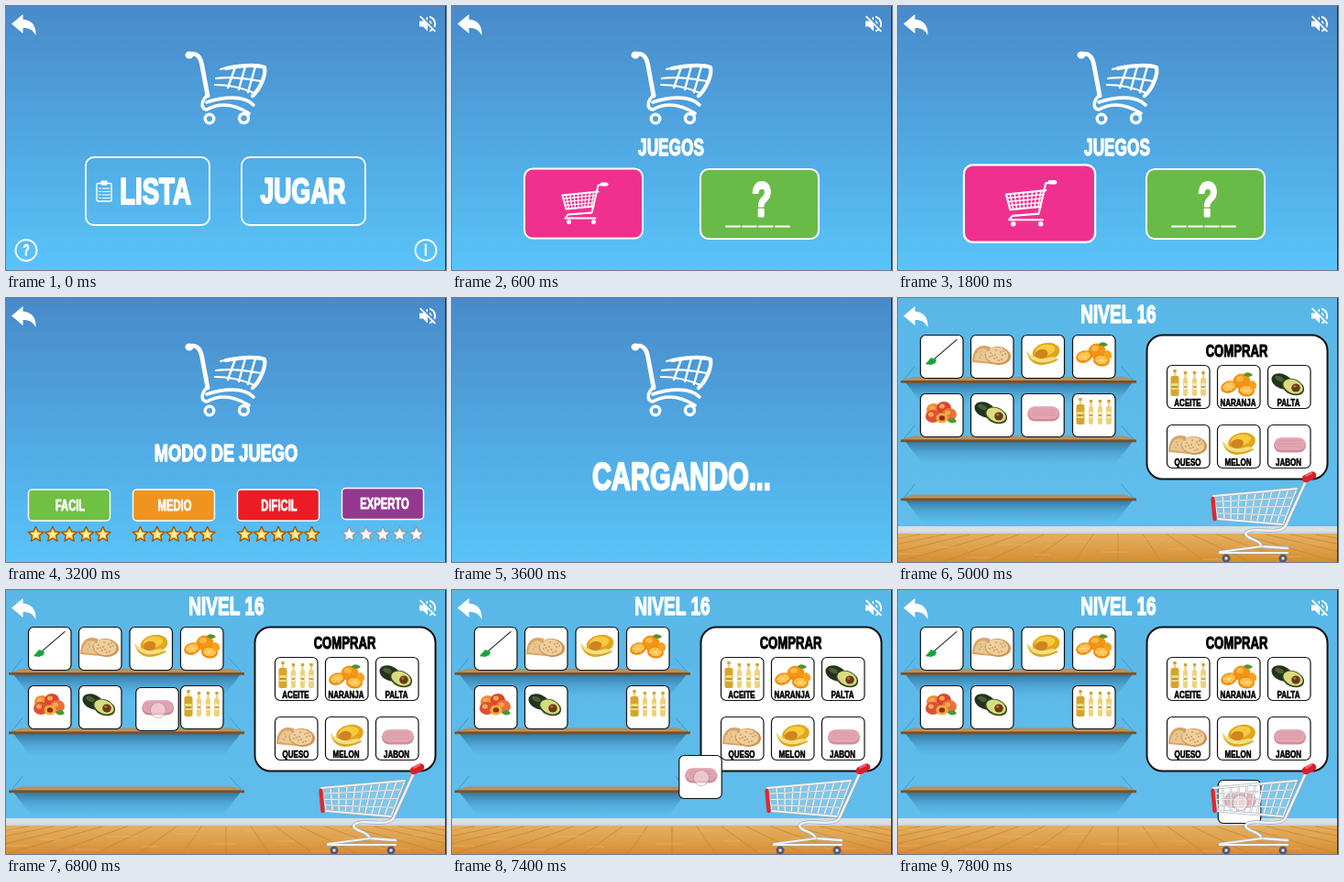
An HTML page with a canvas that plays this animation: 480x288 px, repeating every 8 s.

```html
<!DOCTYPE html>
<html lang="es">
<head>
<meta charset="utf-8">
<title>Juego de compras</title>
<style>
html, body { margin: 0; width: 100%; height: 100%; overflow: hidden; background: #5bb9ea; }
canvas { display: block; width: 100vw; height: 100vh; }
</style>
</head>
<body>
<canvas id="stage" width="480" height="288"></canvas>
<script>
const ctx = document.getElementById('stage').getContext('2d');
const LOOP = 8000, STEP = 200;
const NARROW = 0.69; // condensed lettering for every label

function fill(d, color) {
  ctx.fillStyle = color;
  ctx.fill(new Path2D(d));
}

function line(d, width, color = '#fff') {
  ctx.strokeStyle = color;
  ctx.lineWidth = width;
  ctx.stroke(new Path2D(d));
}

function oval(x, y, rx, ry, color, turn = 0, edge, width = 1) {
  ctx.beginPath();
  ctx.ellipse(x, y, rx, ry, turn, 0, Math.PI * 2);
  if (color) { ctx.fillStyle = color; ctx.fill(); }
  if (edge) { ctx.strokeStyle = edge; ctx.lineWidth = width; ctx.stroke(); }
}

function box(x, y, w, h, r, color, edge, width = 2) {
  ctx.beginPath();
  ctx.roundRect(x, y, w, h, r);
  if (color) { ctx.fillStyle = color; ctx.fill(); }
  if (edge) { ctx.strokeStyle = edge; ctx.lineWidth = width; ctx.stroke(); }
}

// Centred capitals; y is the middle of the letters.
function label(text, x, y, size, color = '#fff') {
  ctx.save();
  ctx.translate(x, y + size * 0.35);
  ctx.scale(NARROW, 1);
  ctx.font = `bold ${size}px "Liberation Sans", Arial, sans-serif`;
  ctx.textAlign = 'center';
  ctx.fillStyle = ctx.strokeStyle = color;
  ctx.lineWidth = size * 0.055;
  ctx.fillText(text, 0, 0);
  ctx.strokeText(text, 0, 0);
  ctx.restore();
}

function at(x, y, scale, draw) {
  ctx.save();
  ctx.translate(x, y);
  ctx.scale(scale, scale);
  draw();
  ctx.restore();
}

function gradient(y0, y1, ...colors) {
  const g = ctx.createLinearGradient(0, y0, 0, y1);
  colors.forEach((c, i) => g.addColorStop(i / (colors.length - 1), c));
  return g;
}

function topIcons() {
  fill('M6 19.5L18.5 9V14.7C27 15 33 20 32.5 32C29 25.5 25 23.8 18.5 24V30Z', '#fff');
  at(448, 7.5, 1, () => fill('M16.5 12C16.5 10.2 15.5 8.7 14 8V10.2L16.4 12.6ZM19 12C19 12.9 18.8 13.8 18.5 14.6L20 16.2C20.6 15 21 13.5 21 12C21 7.7 18 4.1 14 3.2V5.3C16.9 6.1 19 8.8 19 12ZM4.3 3L3 4.3L7.7 9H3V15H7L12 20V13.3L16.2 17.5C15.6 18 14.8 18.4 14 18.7V20.8C15.4 20.5 16.6 19.8 17.7 19L19.7 21L21 19.7ZM12 4L9.9 6.1L12 8.2Z', '#fff'));
}

function emblem() {
  oval(200, 53.5, 4.5, 4, '#fff');
  line('M200 53C208 50 212 56 213.5 63L220 98', 4.8);
  line('M220 97C213 103 212 112 219 113C235 104 252 109 265 117', 3.6);
  line('M219 105C236 99 260 97 270 108', 3.6);
  line('M240 68C256 65 272 63 282 67C284 75 277 91 269 98', 4.2);
  line('M234 69C248 65 266 64 281 67M229 79C244 77 262 79 278 82M228 86C240 86 257 89 271 95', 2.2);
  line('M250 67L242 89M261 66L254 91M272 66L264 94', 2.4);
  oval(222, 123, 4.8, 4.8, null, 0, '#fff', 3.4);
  oval(259.5, 122.5, 5, 5, null, 0, '#fff', 3.4);
}

function skyScreen(icons = true) {
  ctx.fillStyle = gradient(0, 288, '#488aca', '#59c4f9');
  ctx.fillRect(0, 0, 480, 288);
  if (icons) topIcons();
  emblem();
}

function badge(sign, x) {
  oval(x, 266.5, 11.5, 11.5, null, 0, '#fff', 1.8);
  label(sign, x, 266.5, 17);
}

function menu(t) {
  skyScreen();
  box(87, 165, 135, 74, 9, null, '#fff', 1.8);
  label('LISTA', 163, 202, 40);
  box(99, 193.5, 16, 19.5, 1, null, '#fff', 1.4);
  box(103.5, 190.5, 7, 5, 1, '#fff');
  for (let y = 199; y < 211; y += 3.5) line(`M101.5 ${y}h1.5M105 ${y}h8`, 1);
  at(324.5, 202, t < 200 ? 1 : 1.11, () => {
    box(-67.5, -37, 135, 74, 9, null, '#fff', 1.8);
    label('JUGAR', -0.5, 0, 38.5);
  });
  badge('?', 22);
  badge('i', 458);
}

function miniCart() {
  line('M24 -21L16 -20L9 10L-17 12L-20 16H13', 2);
  line('M20 -21H25', 4);
  line('M16 -13L-23 -9L-19 6L11 3', 2);
  for (let i = 0; i < 8; i++) line(`M${-19 + i * 4.3} ${-9 - i * 0.45}L${-16 + i * 3.5} ${6 - i * 0.4}`, 1.3);
  for (let i = 1; i < 4; i++) line(`M${-23 + i} ${-9 + i * 3.6}L${15 - i} ${-13 + i * 4}`, 1.2);
  for (const x of [-16, 11]) oval(x, 20, 2.5, 2.5, '#fff');
}

function games(t) {
  skyScreen();
  label('JUEGOS', 239, 154.5, 25);
  at(143.5, 215.5, t < 1800 ? 1 : 1.11, () => {
    box(-64.5, -38, 129, 76, 9, '#f0308f', '#fff', 2);
    miniCart();
  });
  box(271, 178, 129, 76, 9, '#69bb48', '#fff', 2);
  label('?', 338, 211, 52);
  for (let i = 0; i < 4; i++) line(`M${299 + i * 18} 240.5h15`, 1.8);
}

function star(x, y, r, color, edge) {
  ctx.beginPath();
  for (let i = 0; i < 10; i++) {
    const a = i * Math.PI / 5 - Math.PI / 2, d = i % 2 ? r * 0.48 : r;
    ctx.lineTo(x + d * Math.cos(a), y + d * Math.sin(a));
  }
  ctx.closePath();
  ctx.fillStyle = color;
  ctx.fill();
  if (edge) { ctx.strokeStyle = edge; ctx.lineWidth = 1.2; ctx.stroke(); }
}

const levels = [['FACIL', '#70c043'], ['MEDIO', '#f0941f'], ['DIFICIL', '#ec1c24'], ['EXPERTO', '#92398f']];

function modes() {
  skyScreen();
  label('MODO DE JUEGO', 240, 168.5, 26.5);
  levels.forEach(([name, color], i) => {
    const x = 24.5 + i * 114, last = i === 3, y = last ? 207.5 : 209;
    box(x, y, 89, 34, 4, color, '#fff', 1.4);
    label(name, x + (last ? 46.5 : 45.5), y + 17, 16.3);
    for (let k = 0; k < 5; k++) {
      const sx = x + 8 + k * 18.3;
      star(sx, 258, 8.8, last ? '#e4e8ea' : '#fbb81c', last ? '#8d9aa4' : '#9a4f10');
      star(sx, 258, 5.2, last ? '#fff' : '#fff0a8');
    }
  });
}

function loading() {
  skyScreen(false);
  label('CARGANDO...', 250.5, 194, 42);
}

// Goods are drawn inside a 48 by 48 card.
const goods = {
  broom() {
    line('M15 27L40 5.5', 1.2, '#444');
    fill('M6 32L12 25L18 27L17 31L12 33Z', '#1fae45');
    line('M8 32L13 28M12 32L16 28', 0.8, '#0d7a2c');
  },
  cheese() {
    fill('M2 30C2 16 9 9 21 13L24 32Z', '#d9a468');
    fill('M4 28C5 18 10 13 18 16L21 30Z', '#e9c690');
    oval(30, 23, 14, 10, '#cf9450', 0.1);
    oval(29, 22.5, 12.4, 8.8, '#edcf9d', 0.1);
    for (let i = 0; i < 14; i++) oval(20 + i * 7 % 19, 17 + i * 5 % 12, 1.1, 0.9, '#cf9f66');
    for (let i = 0; i < 6; i++) oval(7 + i * 5 % 11, 19 + i * 3 % 9, 1, 0.8, '#cf9f66');
  },
  melon() {
    oval(27, 19, 15, 10, '#e3a51e', -0.2);
    oval(26, 17, 11, 6, '#f7cb3f', -0.2);
    oval(22, 21, 7, 5, '#cf8420', -0.2);
    fill('M6 18C8 33 22 38 41 27C34 24 28 31 20 29C13 27 9 23 6 18Z', '#d9a826');
    fill('M6 18C9 30 22 34 40 26C32 21 28 28 20 26C13 24 9 21 6 18Z', '#f3df83');
  },
  orange() {
    oval(27, 18, 9.5, 8.5, '#f39414');
    oval(25, 15, 4, 3, '#ffb944');
    for (const [x, y, r] of [[13, 24, -0.3], [32, 28, 0.1]]) {
      oval(x, y, 9, 6.5, '#f08808', r);
      oval(x, y - 0.5, 7.2, 4.8, '#ffbd43', r);
      line(`M${x - 6} ${y}h12M${x - 3} ${y - 4}l6 8M${x + 3} ${y - 4}l-6 8`, 0.8, '#fbe39b');
    }
    oval(39, 22, 4, 5, '#f6a21d', -0.4);
    fill('M29 11C31 7 36 8 39 11C36 14 32 13 29 11Z', '#56922f');
  },
  peach() {
    for (const [x, y, c] of [[15, 18, '#ef8c36'], [26, 16, '#dc4330'], [32, 23, '#e9713a'], [14, 25, '#dc5038']]) {
      oval(x, y, 8, 7, c);
      oval(x - 2, y - 2, 3, 2.6, '#f6a650');
    }
    oval(24, 27, 6.5, 5.5, '#f3ae35');
    oval(24, 27, 3.2, 2.8, '#8f2a20');
    fill('M30 30C35 25 38 27 40 31C36 33 33 33 30 30Z', '#469b38');
  },
  avocado() {
    oval(16, 18, 12, 8, '#24331c', 0.4);
    oval(13, 15, 5, 2.6, '#4a5f36', 0.4);
    oval(28, 24, 12.6, 8.6, '#364a1d', 0.4);
    oval(28, 23.5, 11.2, 7.2, '#d8dc7f', 0.4);
    oval(31, 25, 4.8, 4.6, '#6b3a18');
    oval(29.8, 23.3, 1.7, 1.4, '#b0713a');
  },
  soap() {
    box(7, 14.5, 35, 16, 8, '#d18a98');
    box(8, 14.5, 33, 13.5, 6.7, '#e2a6b1');
    for (let y = 18; y < 27; y += 3) line(`M12 ${y}H37`, 0.8, '#d595a2');
  },
  oil() {
    [[4.5, 9], [18, 5], [28, 5], [37, 6]].forEach(([x, w], i) => {
      const mid = x + w / 2, top = i ? 8 : 6;
      box(mid - 1.2, top, 2.4, 9, 1, '#ead48a');
      box(x, top + 6, w, 28 - top, 2, i ? '#eed27a' : '#d6a52b');
      box(x + 0.7, 20, w - 1.4, 7, 0.5, i ? '#f8ecc2' : '#eadb7b');
      line(`M${x + 1.5} 24h${w - 3}`, 1.4, i % 2 ? '#8c9a38' : '#b07a28');
      box(mid - 1.7, top - 1, 3.4, 3, 0.5, '#cfa32c');
    });
  }
};

function card(x, y, item, name) {
  at(x, y, 1, () => {
    box(0.5, 0.5, 46.5, 47, 5.5, '#fff', '#111', 1.2);
    goods[item]();
    if (name) label(name, 23, 40.5, 11.6, '#000');
  });
}

function shelf(y) {
  fill(`M8 ${y + 6}H256L236 ${y + 32}H28Z`, gradient(y + 6, y + 32, 'rgba(24,76,112,.62)', 'rgba(40,110,155,.25)', 'rgba(60,140,185,0)'));
  line(`M18 ${y - 11}L5 ${y + 5}M244 ${y - 11}L258 ${y + 5}`, 0.8, '#4a8cb0');
  fill(`M17 ${y}H246L260 ${y + 4.5}H3Z`, '#b08a58');
  line(`M16 ${y + 1.5}H248M11 ${y + 3.2}H253`, 0.6, '#c6a06d');
  fill(`M3 ${y + 4}H260V${y + 6.8}H3Z`, '#7b5026');
}

function room() {
  ctx.fillStyle = gradient(0, 249, '#59b7e8', '#60bdec');
  ctx.fillRect(0, 0, 480, 249);
  ctx.fillStyle = gradient(249, 258, '#d3dde3', '#dce2e5', '#c5ccd0');
  ctx.fillRect(0, 249, 480, 9);
  ctx.fillStyle = gradient(257, 288, '#e3ae5f', '#dfa04a', '#d18d34');
  ctx.fillRect(0, 257, 480, 31);
  for (let i = -12; i <= 12; i++) line(`M${240 + i * 27} 258L${240 + i * 48} 288`, 0.8, '#c78733');
  for (let i = 0; i < 14; i++) {
    const x = i * 37 % 480, y = 261 + i * 11 % 25;
    line(`M${x} ${y}h${18 + i % 4 * 5}`, 0.6, '#ecb768');
  }
}

function trolley() {
  const steel = '#a3a8ad', pale = '#f0f2f4';
  const wire = (d, width) => {
    line(d, width, steel);
    line(d, width * 0.65, pale);
  };
  fill('M344 216L435 208L420 247L349 241Z', 'rgba(240,243,246,.2)');
  for (let i = 0; i <= 10; i++) {
    const k = i / 10;
    wire(`M${345 + 90 * k} ${216 - 8 * k}L${349 + 71 * k} ${241 + 6 * k}`, 2.2);
  }
  for (let i = 0; i < 5; i++) {
    const k = i / 4;
    wire(`M${344 + 5 * k} ${216 + 25 * k}L${435 - 15 * k} ${208 + 39 * k}`, i % 4 ? 1.6 : 2.8);
  }
  wire('M447 195L422 250C412 259 386 248 379 257C380 264 394 262 397 271L425 273', 3.8);
  wire('M351 277L397 271M351 278H425', 3);
  for (const [x, y] of [[358, 284], [420, 284]]) {
    oval(x, y, 4.5, 4.5, '#555b62');
    oval(x, y, 1.8, 1.8, '#d9dde0');
  }
  line('M343.5 219L345.5 241', 4.4, '#df2830');
  line('M445 197L452 193.5', 8.5, '#d81f2a');
  line('M445 194L451 191', 2, '#f36a70');
}

// Centre of the dragged card: time, x, y.
const drag = [[6600, 158, 128], [6800, 165, 130], [7000, 226, 142], [7200, 247, 171], [7400, 271, 204], [7600, 331, 219], [7800, 372.5, 231]];

function dragPoint(t) {
  const i = drag.findIndex(p => p[0] > t);
  if (i === 0) return drag[0].slice(1);
  if (i < 0) return drag[drag.length - 1].slice(1);
  const [a, b] = [drag[i - 1], drag[i]], k = (t - a[0]) / (b[0] - a[0]);
  return [a[1] + (b[1] - a[1]) * k, a[2] + (b[2] - a[2]) * k];
}

const shelfX = [24, 79, 134.5, 190];
const list = [['oil', 'ACEITE'], ['orange', 'NARANJA'], ['avocado', 'PALTA'], ['cheese', 'QUESO'], ['melon', 'MELON'], ['soap', 'JABON']];

function shop(t) {
  room();
  topIcons();
  label('NIVEL 16', 240.5, 17.5, 27.5);
  [86, 150.5, 214.5].forEach(shelf);
  ['broom', 'cheese', 'melon', 'orange'].forEach((g, i) => card(shelfX[i], 40, g));
  ['peach', 'avocado', null, 'oil'].forEach((g, i) => g && card(shelfX[i], 104, g));
  box(271.5, 40.5, 197, 157, 17, '#fff', '#111', 2);
  label('COMPRAR', 369.5, 57.5, 19, '#000');
  list.forEach(([g, name], i) => card(293 + i % 3 * 55, i < 3 ? 73 : 138, g, name));
  const [x, y] = dragPoint(t);
  card(x - 23.75, y - 24, 'soap');
  trolley();
  if (t >= 6800) oval(x + 1, y + 1, 8.5, 8.5, 'rgba(255,255,255,.4)', 0, 'rgba(150,140,150,.6)', 1);
}

const scenes = [[5000, shop], [3600, loading], [2000, modes], [600, games], [0, menu]];
const start = performance.now();

function frame(now) {
  const t = Math.floor(Math.max(0, now - start) % LOOP / STEP) * STEP;
  ctx.lineCap = ctx.lineJoin = 'round';
  scenes.find(([from]) => t >= from)[1](t);
  fill('M479 0H480V288H479Z', '#26323c');
  requestAnimationFrame(frame);
}
frame(start);
</script>
</body>
</html>
```
